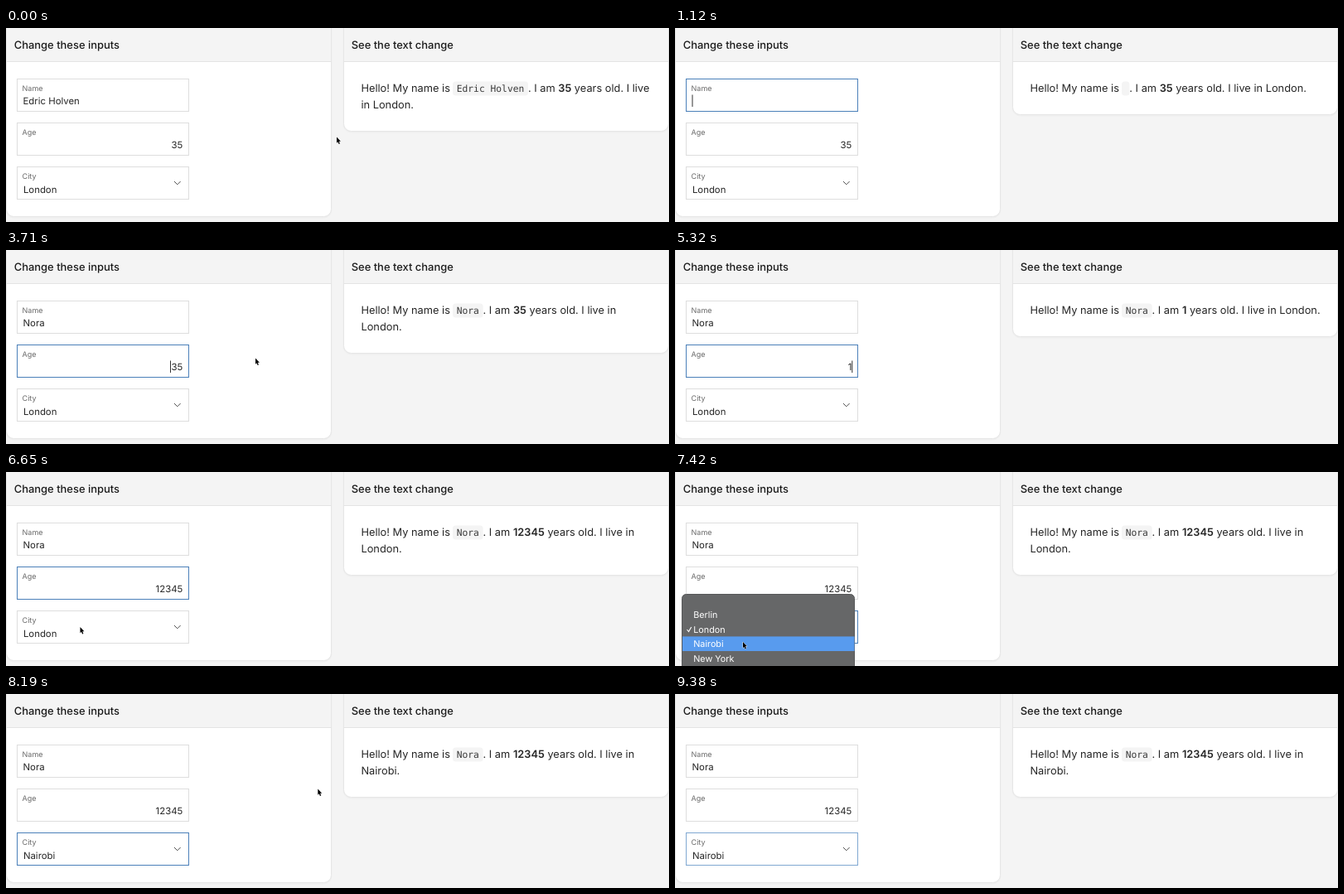
An HTML page for the animation above (9450 ms loop, 800 by 234 pixels).

```html
<!DOCTYPE html>
<html lang="en">
<head>
<meta charset="utf-8">
<title>Inputs and text</title>
<style>
  html, body { margin: 0; width: 100%; height: 100%; overflow: hidden; background: #f4f4f4; }
  svg { display: block; width: 100%; height: 100%; }
  text { font: 12.82px Inter, sans-serif; fill: #262626; white-space: pre; text-rendering: geometricPrecision; }
  .title { font-size: 12.95px; font-weight: 500; fill: #1c1c1c; }
  .label { font-size: 9px; fill: #6a6a6a; }
  .value { font-size: 11.4px; }
  .code { font: 11.3px "DejaVu Sans Mono", monospace; fill: #3a3a3a; }
  .item { font-size: 10.8px; fill: #fff; }
  .bold { font-weight: 600; }
  .field { fill: #fff; stroke: #dedede; }
</style>
</head>
<body>
<svg id="stage" viewBox="0 0 800 234" xmlns="http://www.w3.org/2000/svg"></svg>
<script>
const LOOP = 9450, STEP = 70;
const MONO = 6.8;
const stage = document.getElementById('stage');

function add(tag, attrs, text, parent = stage) {
  const el = document.createElementNS(stage.namespaceURI, tag);
  set(el, attrs);
  if (text) el.textContent = text;
  parent.appendChild(el);
  return el;
}
function set(el, attrs) {
  for (const key in attrs) el.setAttribute(key, attrs[key]);
}
function show(el, on) {
  el.style.display = on ? '' : 'none';
}
const label = (x, y, cls, text, parent) => add('text', { x, y, class: cls }, text, parent);

// Cards
function cardPath(x, bottom) {
  const l = x + .5, r = x + 392.5, b = bottom - .5;
  return `M${l} -5V${b - 9}a9 9 0 0 0 9 9H${r - 9}a9 9 0 0 0 9 -9V-5Z`;
}
function makeCard(x, title) {
  const shade = add('path', { fill: 'none', stroke: '#efefef', 'stroke-width': 2, transform: 'translate(0 1)' });
  const body = add('path', { fill: '#fff', stroke: '#e6e6e6' });
  add('rect', { x: x + 1, y: 0, width: 391, height: 40, fill: '#f4f4f4' });
  add('rect', { x, y: 40, width: 393, height: 1, fill: '#e4e4e4' });
  label(x + 9.7, 24.6, 'title', title);
  return bottom => [shade, body].forEach(p => set(p, { d: cardPath(x, bottom) }));
}
makeCard(0, 'Change these inputs')(228);
const sizeOutput = makeCard(407, 'See the text change');

// Fields
function makeField(name, y) {
  const box = add('rect', { x: 13.5, y: y + .5, width: 207, height: 39, class: 'field' });
  label(19.6, y + 14.7, 'label', name);
  return box;
}
const boxes = {
  name: makeField('Name', 61),
  age: makeField('Age', 114),
  city: makeField('City', 167)
};
const selection = add('rect', { x: 20.5, y: 80.5, height: 15, fill: '#b5d5fb' });
const values = {
  name: label(20.5, 92, 'value'),
  age: label(213.3, 145.2, 'value'),
  city: label(20.9, 199.3, 'value')
};
set(values.age, { 'text-anchor': 'end' });
add('path', { d: 'M203 185l3.8 3.8 3.8-3.8', fill: 'none', stroke: '#4a4a4a' });
const caret = add('rect', { width: 1, height: 14.5, fill: '#333' });

// Output text
label(428.4, 77.3, '', 'Hello! My name is');
const chip = add('rect', { x: 539, y: 64.5, height: 17, rx: 3.5, fill: '#f4f4f4' });
const code = label(543.7, 76.6, 'code');
const rest = label(0, 77.3, '');
add('tspan', {}, '. I am ', rest);
const years = add('tspan', { class: 'bold' }, '', rest);
const after = add('tspan', {}, '', rest);
const second = label(428.4, 97.4, '');

// Drop-down list
const CITIES = ['Berlin', 'London', 'Nairobi', 'New York'];
const list = add('g', {});
add('rect', { x: 8.5, y: 147.5, width: 208, height: 100, rx: 5, fill: '#666768', stroke: '#58595a' }, '', list);
const hover = add('rect', { x: 9, width: 207.5, height: 17.6, fill: '#589bee' }, '', list);
CITIES.forEach((city, i) => label(22.2, 175.8 + i * 17.8, 'item', city, list));
add('path', { d: 'M14.5 190l2 2.6 3.2-5.6', fill: 'none', stroke: '#fff', 'stroke-width': 1.1 }, '', list);

// Pointers
const arrow = add('path', {
  d: 'M0 0V7.2L1.5 5.8 2.6 8.4 3.9 7.9 2.8 5.3H4.9Z',
  fill: '#000', stroke: '#fff', 'stroke-width': .8, 'paint-order': 'stroke'
});
const beam = add('path', {
  d: 'M-1.8 -5.5Q0 -5.5 0 -4Q0 -5.5 1.8 -5.5M0 -4V4M-1.8 5.5Q0 5.5 0 4Q0 5.5 1.8 5.5',
  fill: 'none', stroke: '#222', 'stroke-width': .9
});

// Timelines: [start, value]
const NAMES = [[0, 'Edric Holven'], [1050, ''], [1960, 'N'], [2310, 'No'], [2450, 'Nor'], [2590, 'Nora']];
const AGES = [[0, '35'], [4060, ''], [5250, '1'], [5460, '12'], [5600, '123'], [5810, '1234'], [6020, '12345']];
const TOWNS = [[0, 'London'], [7700, 'Nairobi']];
const FOCUS = [[0, ''], [560, 'name'], [3430, 'age'], [7000, 'city']];
const BLINKS = [[1540, 1960], [3080, 3430], [3920, 4060], [4550, 4830], [6510, 7000]];
const HIDDEN = [[1050, 2730], [4060, 6160], [8820, LOOP]];
const PATH = [
  [0, 399, 131.5], [70, 399, 131.5], [420, 92, 88], [2730, 92, 88], [3150, 150, 139],
  [3430, 150, 139], [3640, 300, 130.5], [3710, 301, 130.5], [6160, 301, 130.5],
  [6580, 89.5, 187], [7070, 89.5, 187], [7350, 82, 205], [7700, 82, 205],
  [8190, 376.3, 114.5], [8400, 420, 85], [8540, 420, 85], [8750, 497, 174], [LOOP, 497, 174]
];

const at = (line, t) => line.reduce((v, [start, value]) => t >= start ? value : v, line[0][1]);
const within = (spans, t) => spans.some(([a, b]) => t >= a && t < b);

function pointerAt(t) {
  const i = PATH.findIndex((p, k) => k && t < p[0]);
  const [t0, x0, y0] = PATH[i - 1], [t1, x1, y1] = PATH[i];
  const k = (t - t0) / (t1 - t0), e = k * k * (3 - 2 * k);
  return [x0 + (x1 - x0) * e, y0 + (y1 - y0) * e];
}

function writeOutput(name, age, city) {
  const width = name.length * MONO;
  // Where the line breaks depends on the room left by name and age.
  const short = name.length < 3 || age === '1';
  const long = name.length > 8;
  set(chip, { width: width + 9.4 });
  code.textContent = name;
  set(rest, { x: 543.7 + width + 4.6 });
  years.textContent = age || '0';
  after.textContent = ' years old. I live' + (long ? '' : ' in') + (short ? ` ${city}.` : '');
  second.textContent = short ? '' : (long ? 'in ' : '') + city + '.';
  sizeOutput(short ? 105 : 125);
}

function draw(t) {
  const name = at(NAMES, t), age = at(AGES, t), city = at(TOWNS, t), focus = at(FOCUS, t);
  const blue = t >= 9380 ? '#80a8d2' : '#4b80b9';
  values.name.textContent = name;
  values.age.textContent = age;
  values.city.textContent = city;
  for (const key in boxes) boxes[key].style.stroke = key === focus ? blue : '';
  writeOutput(name, age, city);

  const nameWidth = values.name.getComputedTextLength();
  const selected = t >= 560 && t < 1050;
  show(selection, selected);
  set(selection, { width: nameWidth + .5 });

  const typing = focus === 'name' || focus === 'age';
  show(caret, typing && !selected && !within(BLINKS, t));
  if (focus === 'name') set(caret, { x: 20.5 + nameWidth, y: 80.5 });
  else set(caret, { x: t < 4060 ? 198 : 213.3, y: 133.5 });

  const [x, y] = pointerAt(t);
  const open = t >= 7000 && t < 7700;
  show(list, open);
  const row = Math.max(0, Math.min(3, Math.floor((y - 162.6) / 17.8)));
  set(hover, { y: 162.8 + row * 17.8 });

  const visible = !within(HIDDEN, t);
  const overText = x > 13 && x < 221 && y > 61 && y < 154 && !open;
  show(arrow, visible && !overText);
  show(beam, visible && overText);
  [arrow, beam].forEach(p => set(p, { transform: `translate(${x} ${y})` }));
}

const begin = performance.now();
function tick() {
  const t = (performance.now() - begin) % LOOP;
  draw(Math.floor(t / STEP) * STEP);
  requestAnimationFrame(tick);
}
tick();
</script>
</body>
</html>
```
